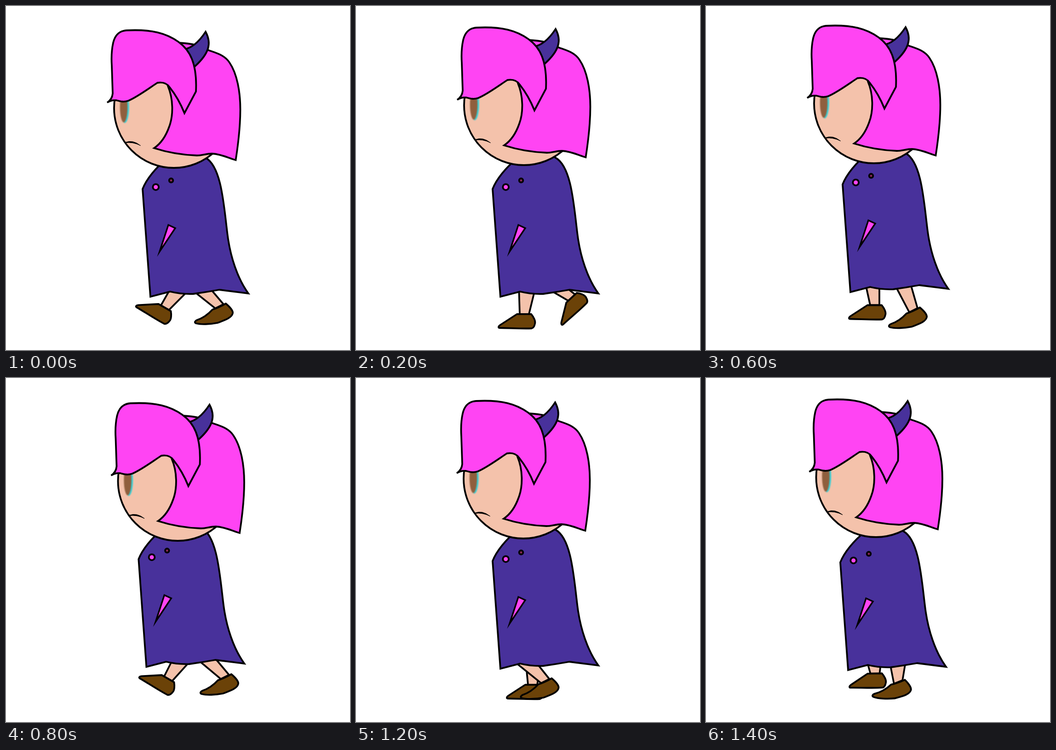
These frames come from a looping animation (748x748 px, 1600 ms). An HTML page:

```html
<!DOCTYPE html>
<html lang="en">
<head>
<meta charset="utf-8">
<title>Walk cycle</title>
<style>
  html, body { margin: 0; width: 100%; height: 100%; overflow: hidden; background: #fff; }
  svg { display: block; width: 100%; height: 100%; stroke: #000; stroke-width: 3.8; stroke-miterlimit: 10; }
  .pink { fill: #ff44f3; }
  .coat { fill: #48319b; }
  .skin { fill: #f4c2ab; }
  .shoe { fill: #6b4208; stroke-linejoin: round; }
</style>
</head>
<body>
<svg viewBox="0 0 748 748">
  <g id="far"><path class="skin"/><path class="shoe"/></g>
  <g id="near"><path class="skin"/><path class="shoe"/></g>

  <g id="body">
    <path class="coat" d="M350 332C326 351 305 377 297 398L314 632L357 621Q382 627 407 626Q436 622 464 617L527 625C503 592 488 545 482 500C474 440 470 350 434 330Q424 323 410 320Z"/>
    <circle class="pink" cx="325.7" cy="393.7" r="6.4"/>
    <circle cx="359" cy="379.3" r="4.3" fill="#8c2a55"/>
    <path class="pink" d="M353 476L368 483L334 534Z" stroke-width="3.4"/>
  </g>

  <g id="head">
    <circle class="skin" cx="365" cy="222" r="130"/>
    <g stroke="none" style="filter:blur(.8px)">
      <ellipse cx="258.2" cy="220" rx="9.5" ry="34.5" fill="#35cfd6"/>
      <ellipse cx="256" cy="220" rx="8.2" ry="33" fill="#8f5f3d"/>
    </g>
    <path d="M259 296.5Q276 290 292.5 303.5Q276 295 259 297.5Z" stroke-width="1"/>
    <path class="pink" d="M322 309C350 318 385 324 415 325C428 325 434 321 448 321C468 322 485 331 499.5 335C506.500 290 509.500 260 509.500 225C509.500 188 503 148 486 123C475 106 456 102 440 96C425 86 400 81 376 80L352 174C364 202 364 238 355 262C348 282 337 299 322 309Z"/>
    <path id="horn" class="coat" d="M384 95C407 92 423 73 434 56C447 80 443 102 411 131L402 138Z"/>
    <path class="pink" d="M388 233L413 186C416 125 400 96 375 78C350 60 318 50 262 53C247 54 237 63 233 80C229 98 229 115 230 130L232 190Q231 203 220 210Q229 204 240 205C250 208 257 209 266 206C285 198 305 183 329 167C342 165 350 168 356 177C368 192 380 213 388 233Z"/>
  </g>
</svg>
<script>
const STEP = 200, HIP_Y = 605;
const SHOE = {
  flat: "M-16 0L15 0C20 6 25 15 23 21C22 26 20 30 16 31C-5 32 -35 30 -53 30C-57 30 -57 27 -53 24L-16 0Z",
  tilt: "M-15 7Q-2 3 14 -6C20 -1 30 9 29 15C27 25 12 30 -4 36C-20 39 -40 40 -51 37C-55 35 -53 32 -49 30C-37 26 -25 18 -15 7Z"
};

// Offsets are [x, y]; legs are [hip left, hip right, ankle x, ankle y, turn, shoe]
const poses = [
  { head: [0, 0], body: [0, 0],
    near: [363, 410, 345.5, 656, 30, "flat"], far: [389, 436, 464, 653, 0, "tilt"] },
  { head: [0, -6], body: [0, 0],
    near: [354, 392, 366, 670, 0, "flat"], far: [400, 448, 469, 634, -43, "flat"] },
  { head: [-2.3, -7.3], body: [1.5, 1.5], horn: [3.5, -.7],
    near: [368, 404, 387, 668, 0, "flat"], far: [330, 381, 411.5, 659, 0, "tilt"] },
  { head: [0, -10], body: [0, -10],
    near: [410, 445, 451, 661.5, 0, "tilt"], far: [347, 377, 367, 650.5, 0, "flat"] },
  { head: [8.5, 2], body: [-8.7, -4],
    near: [408, 451, 476, 650, 0, "tilt"], far: [366, 410, 352.5, 654, 30, "flat"] },
  { head: [0, -4], body: [0, -1.3],
    near: [400, 448, 469, 634, -43, "flat"], far: [356, 390, 372.5, 666, 0, "flat"] },
  { head: [-1, -3], body: [0, 0],
    near: [330, 381, 411.5, 659, 0, "tilt"], far: [368, 404, 384, 667, 0, "flat"] },
  { head: [4.5, -6], body: [-5, 3],
    near: [347, 382, 367.5, 642.5, -1, "flat"], far: [397, 436, 418, 661, 5, "tilt"] }
];

const el = id => document.getElementById(id);
const move = (id, [x, y]) => el(id).setAttribute("transform", `translate(${x} ${y})`);

function drawLeg(id, [left, right, x, y, turn, kind]) {
  const [leg, shoe] = el(id).children;
  const a = (turn - (kind === "tilt" ? 27 : 0)) * Math.PI / 180;
  const dx = 10 * Math.cos(a), dy = 10 * Math.sin(a);
  leg.setAttribute("d", `M${left} ${HIP_Y}L${x - dx} ${y - dy}L${x + dx} ${y + dy}L${right} ${HIP_Y}Z`);
  shoe.setAttribute("d", SHOE[kind]);
  shoe.setAttribute("transform", `translate(${x} ${y}) rotate(${turn})`);
}

function draw(now) {
  const p = poses[Math.floor(now / STEP) % poses.length];
  move("head", p.head);
  move("body", p.body);
  move("horn", p.horn || [0, 0]);
  drawLeg("near", p.near);
  drawLeg("far", p.far);
}

let start;
function tick(now) {
  start ??= now;
  draw(now - start);
  requestAnimationFrame(tick);
}
draw(0);
requestAnimationFrame(tick);
</script>
</body>
</html>
```
